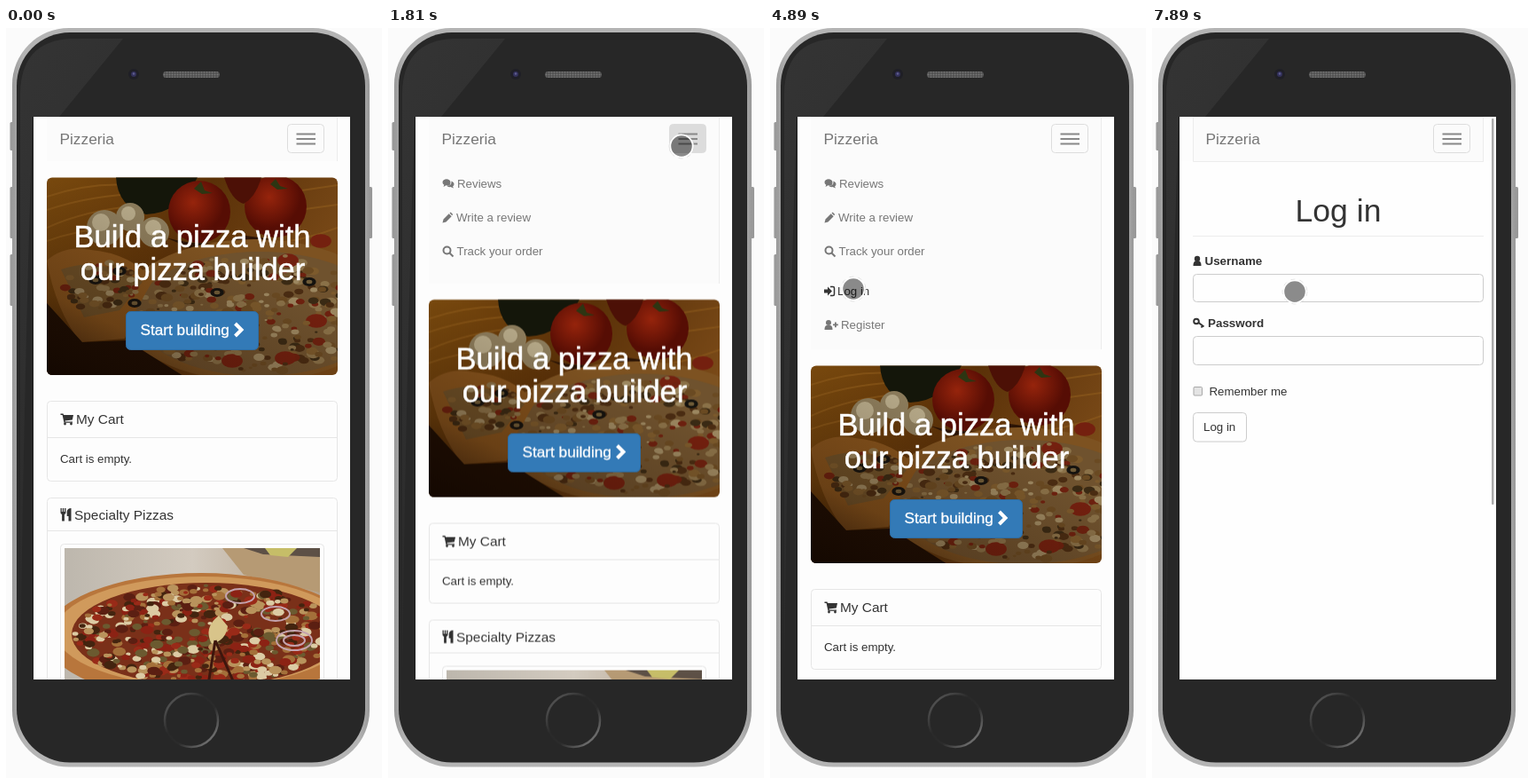
Write an HTML page that moves like this. It is 424 px wide and 845 px high and loops after 8000 ms.

```html
<!DOCTYPE html>
<html lang="en">
<head>
<meta charset="utf-8">
<title>Pizzeria on a phone</title>
<style>
  html, body { margin: 0; width: 100%; height: 100%; overflow: hidden; background: #fbfbfb; }
  svg { display: block; }
  text { font-family: "Liberation Sans", Arial, sans-serif; font-size: 13.3px; fill: #333; }
  .menu { color: #777; }
  .menu text, .brand { fill: currentColor; }
  .brand { color: #777; font-size: 17.3px; }
  .hero { font-size: 34.6px; fill: #fff; stroke: #fff; stroke-width: .5; text-anchor: middle; }
  .action { font-size: 17.2px; fill: #fff; stroke: #fff; stroke-width: .3; }
  .title { font-size: 15.4px; }
  .label { font-size: 13.4px; font-weight: bold; }
  .icon { fill: currentColor; }
  .line { fill: none; stroke: currentColor; stroke-width: 2; }
  .box { fill: none; stroke: #e6e6e6; }
  .field { fill: #fefefe; stroke: #ccc; }
</style>
</head>
<body>
<svg width="424" height="845" viewBox="0 0 424 845" color="#333">
  <defs>
    <clipPath id="screen"><rect x="31" y="100" width="357" height="634"/></clipPath>
    <clipPath id="heroClip"><rect x="46" y="168.500" width="328" height="222.500" rx="6"/></clipPath>
    <clipPath id="dishClip"><rect x="66" y="586" width="288" height="190"/></clipPath>
    <linearGradient id="steel" x2="1" y2="0">
      <stop offset="0" stop-color="#999"/><stop offset=".03" stop-color="#b4b4b4"/>
      <stop offset=".97" stop-color="#b4b4b4"/><stop offset="1" stop-color="#999"/>
    </linearGradient>
    <linearGradient id="gloss" x2=".3" y2="1">
      <stop offset="0" stop-color="#343434"/><stop offset="1" stop-color="#2a2a2a"/>
    </linearGradient>
    <linearGradient id="ring" x2="1" y2="1">
      <stop offset=".1" stop-color="#555"/><stop offset=".4" stop-color="#292929"/>
      <stop offset=".6" stop-color="#2b2b2b"/><stop offset=".9" stop-color="#777"/>
    </linearGradient>
    <linearGradient id="wood" x2="1" y2=".4">
      <stop offset="0" stop-color="#7a4a0e"/><stop offset=".5" stop-color="#5a3108"/><stop offset="1" stop-color="#7a4a18"/>
    </linearGradient>
    <linearGradient id="shade" x1="0" y1="1" x2=".5" y2=".3">
      <stop offset="0" stop-color="#120701" stop-opacity=".85"/><stop offset=".4" stop-color="#1a0b02" stop-opacity=".25"/>
      <stop offset="1" stop-color="#1a0b02" stop-opacity="0"/>
    </linearGradient>
    <linearGradient id="wall" x2="1" y2="0">
      <stop offset="0" stop-color="#bdb7ad"/><stop offset=".5" stop-color="#d3cbc0"/><stop offset="1" stop-color="#b3a18c"/>
    </linearGradient>
    <radialGradient id="tomato" cx=".4" cy=".35">
      <stop offset="0" stop-color="#96240c"/><stop offset="1" stop-color="#560d04"/>
    </radialGradient>
    <pattern id="mesh" width="3" height="3" patternUnits="userSpaceOnUse">
      <rect width="3" height="3" fill="#505050"/><circle cx="1.500" cy="1.500" r="1" fill="#777"/>
    </pattern>
  </defs>

  <!-- phone body -->
  <rect width="424" height="845" fill="#fbfbfb"/>
  <g fill="#999">
    <rect x="4.500" y="106" width="5" height="32" rx="1.500"/>
    <rect x="4.500" y="179" width="5" height="58" rx="1.500"/>
    <rect x="4.500" y="255" width="5" height="58" rx="1.500"/>
    <rect x="408" y="179" width="5" height="58" rx="1.500"/>
  </g>
  <rect x="7" y="0" width="403" height="832.500" rx="64" fill="url(#steel)"/>
  <rect x="12" y="5" width="393" height="822.500" rx="60" fill="#272727"/>
  <path d="M132 12H74Q17 14 16 74V730Q20 400 30 100H60Z" fill="url(#gloss)"/>
  <circle cx="144" cy="52" r="6" fill="#1f1f26"/>
  <circle cx="144" cy="52" r="3" fill="#34325c"/>
  <circle cx="144" cy="51.500" r="1.200" fill="#605e90"/>
  <rect x="177" y="49" width="64" height="7" rx="3.500" fill="url(#mesh)"/>
  <circle cx="209" cy="780" r="30" fill="none" stroke="url(#ring)" stroke-width="2.500"/>
  <rect x="30" y="100" width="358" height="634" fill="#1b1b1b"/>

  <g clip-path="url(#screen)">
    <rect x="31" y="100" width="357" height="634" fill="#fdfdfd"/>

    <!-- expanded navigation -->
    <rect x="46" y="100" width="328" height="300" fill="#fbfbfb"/>
    <path d="M46 100.500H373.500V400" fill="none" stroke="#ececec"/>
    <g class="menu">
      <path class="icon" d="M61.500 174c0-5 9-5 9 0s-4 3.500-5 3.200L62.500 179l.8-2.300Q61.500 175.500 61.500 174ZM71.500 172.500c4 1.500 3.500 5 1.500 6l1 2-3.500-1.400q-2 .3-4-.9 5.500-.5 5-5.700Z"/>
      <text x="78" y="180">Reviews</text>
      <path class="icon" d="M61.500 219.500l1-4 6.200-6.200 3 3-6.200 6.200ZM69.500 208.500l1.200-1 2.500 2.500-1 1.300Z"/>
      <text x="77" y="218">Write a review</text>
      <g class="line"><circle cx="66.500" cy="250.500" r="4"/><path d="M69.500 253.500l4 4"/></g>
      <text x="77.500" y="256">Track your order</text>
      <g id="login">
        <path class="icon" d="M61 294.500h4v-3l5 5-5 5v-3h-4Z"/>
        <path class="line" style="stroke-width:1.500" d="M68 291.500h3q1.500 0 1.500 1.500v7q0 1.500-1.500 1.500h-3"/>
        <text x="76" y="301">Log in</text>
      </g>
      <circle class="icon" cx="66" cy="332" r="3"/>
      <path class="icon" d="M61.500 340q0-5 3-5h3q3 0 3 5ZM71 333.500h2v-2h1.800v2h2v1.800h-2v2H73v-2h-2Z"/>
      <text x="80" y="339">Register</text>
    </g>

    <!-- page below the navigation -->
    <g id="content">
      <rect x="31" y="150" width="357" height="600" fill="#fdfdfd"/>
      <g clip-path="url(#heroClip)">
        <rect x="46" y="168" width="328" height="224" fill="url(#wood)"/>
        <path d="M46 190Q100 172 150 178M46 205Q120 180 200 190M46 225Q90 205 150 200M46 240Q80 228 110 226M230 245Q310 250 374 225M320 185l54-8M330 205l44-6" fill="none" stroke="#94601f" stroke-width="2" opacity=".5"/>
        <path d="M124 168q2 34 34 42 40-2 58-42Z" fill="#14160a"/>
        <circle cx="218" cy="207" r="35" fill="url(#tomato)"/>
        <circle cx="304" cy="201" r="35" fill="url(#tomato)"/>
        <path d="M246 168q8 26 22 30 14-8 20-30Z" fill="#4c1006"/>
        <path d="M212 181l8-8 4 10 9 3-12 1ZM298 176l6-6 5 8 9 3-12 1Z" fill="#2d3512"/>
        <path d="M180 236Q230 250 270 234L300 238 240 262Z" fill="#2b1405"/>
        <g fill="#8a7a5a"><circle cx="111" cy="225" r="20"/><circle cx="140" cy="213" r="16"/><circle cx="167" cy="230" r="17"/></g>
        <g fill="#b3a686"><circle cx="107" cy="219" r="10"/><circle cx="138" cy="209" r="8"/><circle cx="166" cy="225" r="9"/></g>
        <ellipse cx="280" cy="318" rx="152" ry="80" fill="#7d5221"/>
        <ellipse cx="286" cy="322" rx="140" ry="70" fill="#6f522e"/>
        <g id="heroTop"></g>
        <path d="M46 262Q66 244 96 250 140 254 166 284L144 322 134 350 84 354Q56 318 46 262Z" fill="#84521c"/>
        <path d="M62 272Q106 256 154 286L128 318 88 326Z" fill="#6d5028"/>
        <g id="sliceTop"></g>
        <path d="M46 310l40 44 50-2 64 40H46Z" fill="#1c0d03"/>
        <rect x="46" y="168" width="328" height="224" fill="url(#shade)"/>
      </g>
      <text class="hero" x="210" y="247">Build a pizza with</text>
      <text class="hero" x="210.500" y="284">our pizza builder</text>
      <rect x="135.500" y="319.500" width="149" height="43" rx="5" fill="#337ab7" stroke="#2e6da4"/>
      <text class="action" x="151.500" y="346">Start building</text>
      <path d="M258.500 333l7 7-7 7" fill="none" stroke="#fff" stroke-width="4"/>

      <rect class="box" x="46.500" y="420.500" width="327" height="90" rx="4"/>
      <path class="box" d="M47 461.500H373"/>
      <path class="icon" d="M61.500 434.500h3l.6 1.500H76l-1.200 5.500-8.300 1 .3 1H75v1.300h-9.500L63.600 436h-2.100Z"/>
      <circle class="icon" cx="66.500" cy="446" r="1.400"/><circle class="icon" cx="73.500" cy="446" r="1.400"/>
      <text class="title" x="79" y="446">My Cart</text>
      <text x="61" y="490">Cart is empty.</text>

      <rect class="box" x="46.500" y="529.500" width="327" height="400" rx="4"/>
      <path class="box" d="M47 566.500H373"/>
      <path class="icon" d="M61.500 541h1.300v4h1v-4h1.400v4h1v-4h1.300v5q0 1.500-1.600 2v7.500h-2.800V548q-1.600-.5-1.600-2ZM73.500 541v14.500h-3V550h-1.800v-5q.5-4 4.800-4Z"/>
      <text class="title" x="77" y="554">Specialty Pizzas</text>
      <rect class="box" x="61.500" y="581.500" width="297" height="220" rx="4"/>
      <g clip-path="url(#dishClip)">
        <rect x="66" y="586" width="288" height="200" fill="url(#wall)"/>
        <path d="M244 586h110v50l-86-20Z" fill="#b69a74"/>
        <path d="M268 586h86v10l-64-3Z" fill="#5d5046"/>
        <path d="M292 586h36l-10 10-20-2Z" fill="#c6bd68"/>
        <ellipse cx="220" cy="686" rx="176" ry="72" fill="#b8763c"/>
        <ellipse cx="222" cy="680" rx="166" ry="62" fill="#d09a5c"/>
        <ellipse cx="226" cy="683" rx="152" ry="58" fill="#7a3019"/>
        <g id="dishTop"></g>
        <g fill="none" stroke="#c4a3ae" stroke-width="2">
          <ellipse cx="325" cy="690" rx="20" ry="11"/><ellipse cx="325" cy="690" rx="12" ry="6"/>
          <ellipse cx="264" cy="640" rx="16" ry="8"/><ellipse cx="304" cy="660" rx="16" ry="8"/>
        </g>
        <path d="M240 662q-18 14-8 32 16-4 18-20Z" fill="#d8c48a"/>
        <path d="M236 690l-8 50M236 690l22 50" stroke="#3d160d" stroke-width="3"/>
      </g>
    </g>

    <!-- login page -->
    <g id="form">
      <rect x="31" y="150" width="357" height="584" fill="#fefefe"/>
      <path d="M46.500 100V150.500H374M46 234.500H374" fill="none" stroke="#ececec"/>
      <text x="210" y="218" text-anchor="middle" style="font-size:35.600px">Log in</text>
      <circle class="icon" cx="51" cy="260" r="3.200"/>
      <path class="icon" d="M46.500 268q0-5.500 3-5.500h3q3 0 3 5.500Z"/>
      <text class="label" x="59.500" y="267">Username</text>
      <rect class="field" x="46.500" y="277.500" width="327" height="31" rx="4"/>
      <circle class="line" cx="50" cy="330.500" r="2.800"/>
      <path class="line" d="M52.500 332l6 4.500M57 335.500l-1.500 2"/>
      <text class="label" x="63" y="337">Password</text>
      <rect class="field" x="46.500" y="347.500" width="327" height="32" rx="4"/>
      <rect x="47" y="404.500" width="9.500" height="9.500" rx="1" fill="#e4e4e4" stroke="#a8a8a8"/>
      <text x="64.500" y="414">Remember me</text>
      <rect class="field" x="46.500" y="433.500" width="60" height="32.500" rx="4"/>
      <text x="58" y="454">Log in</text>
      <rect x="383" y="102" width="2.500" height="435" rx="1" fill="#aaa"/>
    </g>

    <!-- top bar -->
    <text class="brand" x="60.500" y="130.500">Pizzeria</text>
    <rect id="toggle" x="317.500" y="108.500" width="41" height="32" rx="4" fill="#fbfbfb" stroke="#ddd"/>
    <path d="M327.500 119.500h21.500M327.500 125h21.500M327.500 130.500h21.500" stroke="#888" stroke-width="2"/>

    <g id="finger">
      <circle r="13.800" fill="none" stroke="#ccc" stroke-width=".7" stroke-dasharray="5 5"/>
      <circle r="12.600" fill="none" stroke="#fff" stroke-width="2" opacity=".95"/>
      <circle id="dot" r="11.800" fill="#000" fill-opacity=".45"/>
    </g>
  </g>
</svg>

<script>
const LOOP = 8000;
const $ = id => document.getElementById(id);

// seeded toppings inside an ellipse
function scatter(group, seed, count, [cx, cy, rx, ry], size, colours) {
  const random = () => (seed = seed * 16807 % 2147483647) / 2147483647;
  for (let i = 0; i < count; i++) {
    const angle = random() * Math.PI * 2, reach = Math.sqrt(random());
    const r = size * (0.5 + random());
    const blob = document.createElementNS("http://www.w3.org/2000/svg", "ellipse");
    const attrs = {
      cx: cx + Math.cos(angle) * reach * rx, cy: cy + Math.sin(angle) * reach * ry,
      rx: r, ry: r * 0.65, fill: colours[i % colours.length]
    };
    for (const key in attrs) blob.setAttribute(key, attrs[key]);
    group.append(blob);
  }
}

function spots(group, points, size, colour) {
  for (const [x, y] of points) scatter(group, 65536, 1, [x, y, 0, 0], size, [colour]);
}

const heroColours = ["#6e210f", "#8a7148", "#4a2c12", "#7c5a2c", "#6a4a22", "#3a2a14", "#9c8760"];
const olives = [[145, 310], [101, 284], [238, 298], [342, 286], [128, 274]];
scatter($("heroTop"), 71, 260, [286, 322, 136, 67], 5, heroColours);
spots($("heroTop"), [[355, 240], [318, 262], [230, 332], [315, 372], [255, 375], [350, 330]], 14, "#74200f");
scatter($("heroTop"), 23, 90, [286, 322, 136, 67], 3, heroColours);
scatter($("sliceTop"), 19, 60, [108, 292, 42, 28], 4, heroColours);
spots($("sliceTop"), olives, 9, "#15130f");
spots($("sliceTop"), olives, 4, "#6f5b37");
scatter($("dishTop"), 37, 560, [226, 683, 148, 55], 5,
  ["#8c2214", "#b9935c", "#5b1f12", "#a4703a", "#992a18", "#43240f", "#dccba4", "#6b5a30"]);

// steps: [time, value, easing to the next step]
function play(el, prop, steps, easing = "linear") {
  const first = [0, steps[0][1]], last = [LOOP, steps[steps.length - 1][1]];
  const frames = [first, ...steps, last].map(([time, value, ease]) =>
    ({ offset: time / LOOP, [prop]: value, easing: ease || easing }));
  el.animate(frames, { duration: LOOP, iterations: Infinity });
}
const hold = "step-end";

play($("content"), "transform", [[1679, "translateY(0px)", "ease"], [2029, "translateY(212px)"]]);
play($("toggle"), "fill", [[0, "#fbfbfb"], [1260, "#dcdcdc"], [4250, "#fbfbfb"]], hold);
play($("login"), "color", [[0, "#777"], [3790, "#333"]], hold);
play($("form"), "opacity", [[0, 0], [7690, 1]], hold);
play($("finger"), "opacity", [[0, 0], [350, 1]], hold);
play($("dot"), "fillOpacity", [[0, 0.45], [7180, 0.52], [7270, 0.45]], hold);

const path = [
  [350, 215, 225], [490, 261, 150], [630, 321, 119], [860, 321, 119], [900, 298, 132], [1060, 331, 133],
  [2070, 331, 133], [2150, 300, 178], [2230, 257, 210], [2300, 213, 243], [2370, 175, 274],
  [2440, 138, 305], [2510, 120, 318], [2720, 100, 331], [3230, 100, 331], [3560, 94, 294],
  [6000, 94, 294], [6080, 103, 286], [6150, 137, 296], [6210, 172, 298], [6290, 213, 335],
  [6330, 193, 339], [6450, 165, 308], [6600, 120, 298], [6770, 93, 295],
  [7650, 93, 294], [7890, 161, 297]
];
play($("finger"), "transform", path.map(([t, x, y]) => [t, `translate(${x}px, ${y}px)`]));
</script>
</body>
</html>
```
